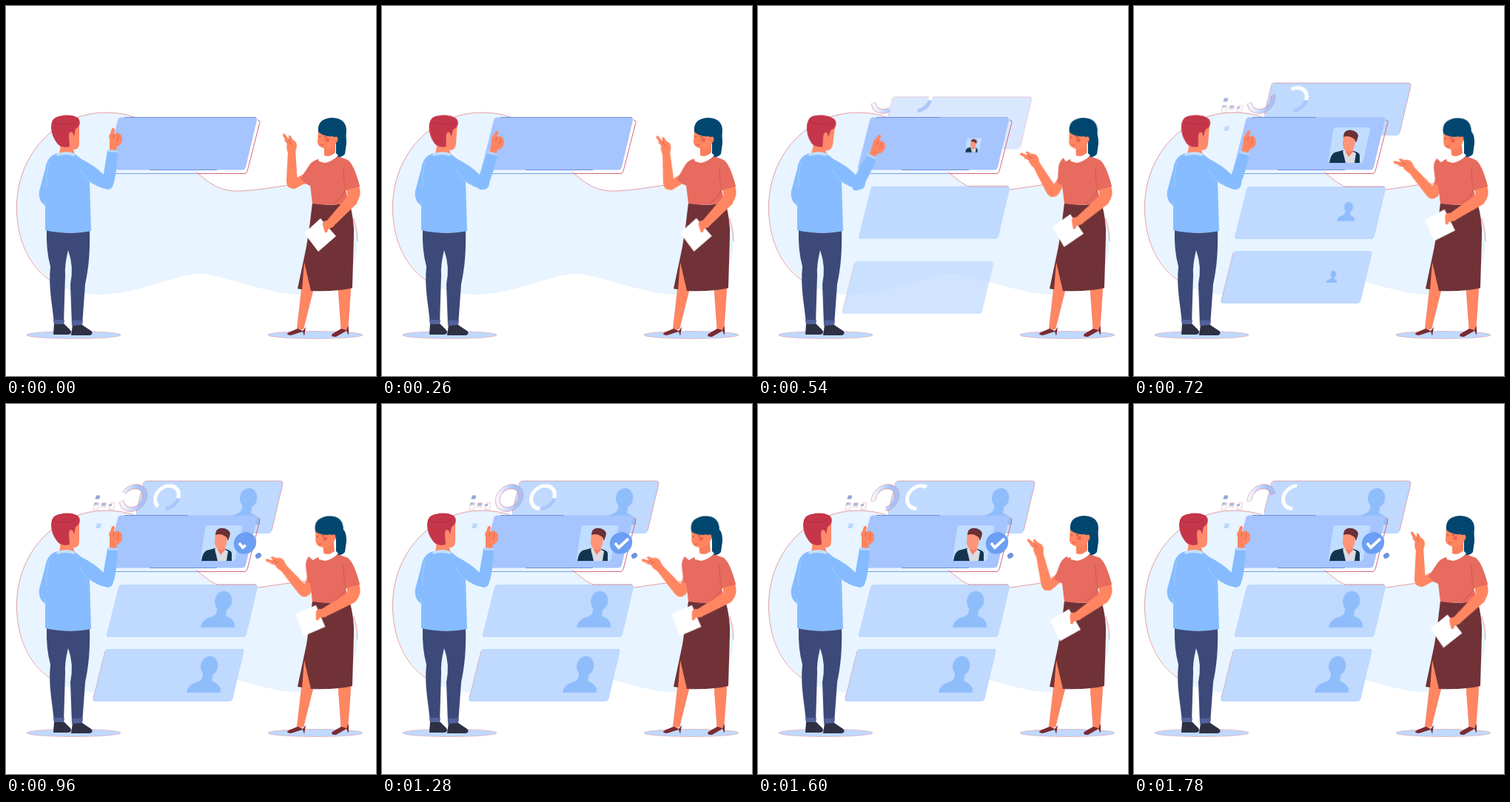
Write an HTML page without scripts that moves like this. It is 500x500 px and loops after 1800 ms.

```html
<!DOCTYPE html>
<html lang="en">
<head>
<meta charset="utf-8">
<title>Choosing a candidate</title>
<style>
html, body { margin: 0; width: 100%; height: 100%; overflow: hidden; background: #fff; }
svg { display: block; width: 100%; height: 100%; }

svg * { animation: 1800ms linear infinite; }

/* people */
.reach { transform-origin: 138px 238px; animation-name: reach; animation-timing-function: ease-in-out; }
.nod { transform-origin: 84px 200px; animation-name: nod; animation-timing-function: ease-in-out; }
.wave { transform-origin: 414px 224px; animation-name: wave; }
.note { transform-origin: 470px 260px; animation-name: note; }
.look { transform-origin: 442px 208px; animation-name: look; animation-timing-function: ease-in-out; }
@keyframes reach {
  0%, 6.7% { transform: none; }
  22.2%, 28% { transform: translate(-4px, 3px) rotate(20deg); }
  40% { transform: translate(-2px, 1px) rotate(10deg); }
  51%, 100% { transform: none; }
}
@keyframes nod {
  0%, 6.7% { transform: none; }
  22.2%, 28% { transform: rotate(8deg); }
  40% { transform: rotate(4.5deg); }
  51%, 100% { transform: none; }
}
@keyframes wave {
  0%, 6.7% { transform: none; animation-timing-function: ease-in; }
  22.2% { transform: rotate(-13deg); animation-timing-function: ease-out; }
  40%, 72% { transform: rotate(-40.5deg); animation-timing-function: ease-in; }
  88.9% { transform: rotate(-13deg); animation-timing-function: ease-out; }
  98.9%, 100% { transform: none; }
}
@keyframes note {
  0%, 6.7% { transform: none; animation-timing-function: ease-in; }
  22.2% { transform: rotate(1deg); }
  40% { transform: rotate(14.5deg); animation-timing-function: ease-out; }
  50%, 72% { transform: rotate(18deg); animation-timing-function: ease-in; }
  88.9% { transform: rotate(12deg); }
  98.9%, 100% { transform: rotate(3deg); }
}
@keyframes look {
  0%, 24% { transform: none; }
  40%, 74% { transform: rotate(-6deg); }
  89%, 100% { transform: none; }
}

/* cards slide along their slant */
.top { animation-name: top; }
.mid { animation-name: mid; }
.low { animation-name: low; }
.edge { animation-name: edge; }
@keyframes top {
  0%, 25% { opacity: 0; transform: translate(-11px, 46px); animation-timing-function: ease-out; }
  37%, 100% { opacity: 1; transform: none; }
}
@keyframes mid {
  0%, 15.5% { opacity: 0; transform: translate(11px, -46px); animation-timing-function: linear; }
  22.2% { opacity: .6; transform: translate(6px, -22px); animation-timing-function: ease-out; }
  31%, 100% { opacity: 1; transform: none; }
}
@keyframes low {
  0%, 23.5% { opacity: 0; transform: translate(-13px, 52px); animation-timing-function: ease-out; }
  35.5%, 100% { opacity: 1; transform: none; }
}
@keyframes edge { 0%, 26% { opacity: 1; } 33%, 100% { opacity: 0; } }

/* avatars, portrait, badge */
.a1 { animation-name: a1; }
.a2 { animation-name: a2; }
.a3 { animation-name: a3; }
.chest { animation-name: chest; }
.photo { animation-name: photo; }
.badge { animation-name: badge; }
.tick { stroke-dasharray: 100 200; animation-name: tick; }
@keyframes a1 { 0%, 41% { transform: scale(0); } 50% { transform: scale(1.05); } 53%, 100% { transform: none; } }
@keyframes a2 { 0%, 34% { transform: scale(0); } 40% { transform: scale(.52); } 48% { transform: scale(1.05); } 53%, 100% { transform: none; } }
@keyframes a3 { 0%, 36% { transform: scale(0); } 40% { transform: scale(.32); } 49% { transform: scale(1.05); } 53%, 100% { transform: none; } }
@keyframes chest { 0%, 90% { transform: none; } 99%, 100% { transform: scaleX(1.12); } }
@keyframes photo { 0%, 27% { transform: scale(0); } 35% { transform: scale(1.06); } 38%, 100% { transform: none; } }
@keyframes badge { 0%, 43% { transform: scale(0); } 52%, 100% { transform: none; } }
@keyframes tick { 0%, 48% { stroke-dashoffset: 100; } 53.3% { stroke-dashoffset: 50; } 60%, 100% { stroke-dashoffset: 0; } }

/* rings: the head grows, then the tail is wiped */
.r1 { animation-name: r1; }
.r2 { animation-name: r2; }
.r3 { animation-name: r3; }
@keyframes r1 {
  0%, 19% { stroke-dasharray: 0 720; stroke-dashoffset: 0; opacity: 0; }
  19.1% { opacity: 1; }
  22.2% { stroke-dasharray: 40 720; }
  40% { stroke-dasharray: 190 720; }
  53.3% { stroke-dasharray: 318 720; }
  62%, 74% { stroke-dasharray: 360 720; stroke-dashoffset: 0; }
  88.9% { stroke-dasharray: 270 720; stroke-dashoffset: -90; }
  98.9%, 100% { stroke-dasharray: 175 720; stroke-dashoffset: -185; opacity: 1; }
}
@keyframes r2 {
  0%, 19% { stroke-dasharray: 0 720; opacity: 0; }
  19.1% { opacity: 1; }
  22.2% { stroke-dasharray: 62 720; }
  26%, 72% { stroke-dasharray: 80 720; stroke-dashoffset: 0; opacity: 1; }
  80%, 100% { stroke-dasharray: 0 720; stroke-dashoffset: -80; opacity: 0; }
}
@keyframes r3 {
  0%, 25% { stroke-dasharray: 0 720; stroke-dashoffset: -80; opacity: 0; }
  25.1% { opacity: 1; }
  40% { stroke-dasharray: 125 720; }
  53.3% { stroke-dasharray: 238 720; }
  62%, 74% { stroke-dasharray: 270 720; stroke-dashoffset: -80; }
  88.9% { stroke-dasharray: 208 720; stroke-dashoffset: -147; }
  98.9%, 100% { stroke-dasharray: 178 720; stroke-dashoffset: -177; opacity: 1; }
}

.bits { animation-name: bits; }
@keyframes bits {
  0%, 30% { opacity: 0; transform: translateY(5px); }
  42%, 100% { opacity: 1; transform: none; }
}
</style>
</head>
<body>
<svg viewBox="0 0 500 500">
  <defs>
    <linearGradient id="sheen">
      <stop offset=".25" stop-color="#a5c2fb"/>
      <stop offset=".95" stop-color="#f3f7ff"/>
    </linearGradient>
    <path id="card" d="M21 0H201q4 0 3 4L189 67q-1 4-5 4H3q-4 0-3-4L16 4q1-4 5-4z"/>
    <g id="avatar" fill="#8fbdfb">
      <ellipse cx="7.500" cy="-12" rx="11.500" ry="13.500" transform="rotate(10 7 -11)"/>
      <path d="M0-4H13L11 8H-3z"/>
      <path class="chest" d="M-23 24Q-22 13-7 9L-1 5H9L12 9Q24 13 23 24z"/>
    </g>
  </defs>

  <path fill="#e8f4ff" d="M14.500 272C14.500 200 68 144 135 144C200 144 215 185 257 224C275 240 290 251 315 250C350 249 380 240 410 240C450 241 475 280 475 318C475 365 440 390 395 389C360 391 305 367 265 362C225 362 180 390 125 390C60 390 14.500 340 14.500 272z"/>
  <g fill="none" stroke="#df8492" stroke-width=".8">
    <path d="M60 371C30 350 14.500 315 14.500 272C14.500 200 68 144 135 144C152 144 166 147 178 152"/>
    <path d="M257 224C275 240 290 251 315 250C350 249 380 240 410 240"/>
    <path d="M470 287Q475 302 475 318"/>
  </g>
  <g fill="#bfd9ff" stroke="#dd9aa8" stroke-width=".6">
    <ellipse cx="91.500" cy="444.500" rx="63.500" ry="5"/>
    <ellipse cx="418" cy="444.500" rx="64" ry="5"/>
  </g>

  <!-- cards -->
  <g fill="#bfd9ff">
    <g class="top">
      <use href="#card" x="170" y="104"/>
      <path d="M176 146L186 106q1-2 4-2H371q3 0 3 4L359 171" fill="none" stroke="#d795a6" stroke-width=".8"/>
    </g>
    <g transform="translate(320 139)"><g class="a1"><use href="#avatar"/></g></g>
    <g class="mid">
      <use href="#card" x="136" y="244"/>
      <path d="M284 244H338" stroke="#d9808f" stroke-width=".9"/>
    </g>
    <g class="low">
      <use href="#card" x="117.500" y="331"/>
      <path d="M134 334L118 398" stroke="#d9a3b2" stroke-width=".7"/>
    </g>
  </g>
  <g transform="translate(286 278)"><g class="a2"><use href="#avatar"/></g></g>
  <g transform="translate(267 366)"><g class="a3"><use href="#avatar"/></g></g>
  <use href="#card" x="135" y="150.500" fill="#a6c4fd"/>
  <g fill="none" stroke-width="1">
    <path d="M160 150.500H246M194 221.500H285" stroke="#6c8fda"/>
    <path class="edge" d="M246 150.500H338" stroke="#6c8fda"/>
    <path d="M146 226.500H258" stroke="#7c9fe8"/>
    <path d="M258 226.500H322q3 0 4-3L343 157q0-3-3-3" stroke="#d9667c"/>
  </g>

  <!-- rings -->
  <g fill="none" stroke-width="5">
    <g transform="translate(172 127) skewX(-12) rotate(-15) scale(-1 1)">
      <circle class="r1" r="15.500" pathLength="360" stroke="#d98c9f" stroke-width="6.200"/>
      <circle class="r1" r="15.500" pathLength="360" stroke="url(#sheen)"/>
    </g>
    <g transform="translate(217.500 126) skewX(-12) rotate(-95) scale(-1 1)">
      <circle class="r2" r="15.500" pathLength="360" stroke="#a9c6fb"/>
      <circle class="r3" r="15.500" pathLength="360" stroke="#fff"/>
    </g>
  </g>

  <g class="bits">
    <path d="M122 123.500h5.500l-1.500 5h-5.500z" fill="#93a6d2"/>
    <g fill="#fff" stroke="#d9a9b6" stroke-width=".6">
      <path d="M120 133.500h6l-2 9.500h-6z"/>
      <path d="M130 133.500h6l-1.500 5.500h-6z"/>
      <path d="M141 133.500h6l-2 9h-6z"/>
    </g>
    <path d="M119.500 133.500h5l-1 3h-5zM130 134h5l-1 3.500h-5zM139.500 135h4l-1 3h-4z" fill="#a9b4d8"/>
    <path d="M123 161.500h6l-1.500 6.500h-6.500z" fill="#b9d7fd"/>
  </g>

  <!-- portrait -->
  <g transform="translate(291 188)"><g class="photo">
    <path d="M-18-24H25q4 0 3 4L19 20q-1 4-4 4H-25q-4 0-3-4L-22-20q1-4 4-4z" fill="#c0ddff"/>
    <path d="M-27 24Q-25 12-20 10L-9 7 6 8Q14 10 14 14V24z" fill="#14344f"/>
    <path d="M-9 8L-5 6 4 8 9 11 7 24H-5z" fill="#d9dce3"/>
    <path d="M-5 4H5V9L-1 16-5 9z" fill="#f58268"/>
    <path d="M-8-13Q-2-17 8-12L7 1Q5 9-1 9-8 8-9-1z" fill="#ff9478"/>
    <path d="M-8-12Q-8-20 1-20.500 12-19 12-12L9-3 7-8Q-1-14-8-11z" fill="#6a3137"/>
  </g></g>

  <!-- badge -->
  <g transform="translate(323 188)"><g class="badge">
    <ellipse rx="15.500" ry="14.500" transform="rotate(-35)" fill="#6c9ef3"/>
    <ellipse cx="18" cy="17" rx="4.200" ry="3.500" transform="rotate(-35 18 17)" fill="#6f94dc"/>
    <path class="tick" pathLength="100" d="M-8 0L-3 6 10-6" fill="none" stroke="#fff" stroke-width="3.800"/>
  </g></g>

  <!-- man -->
  <g>
    <path d="M65 429H78L87 438Q90 443 84 444H64z" fill="#2e3044"/>
    <path d="M90 431H103L115 439Q119 443 113 445H88z" fill="#2e3044"/>
    <path d="M55 302Q85 310 113 304C114 340 110 362 107 376L103 431 89 432 87 376Q92 352 84 330Q79 350 80 364L78 430 65 430C63 404 57 382 60 352Q54 330 55 302z" fill="#3d4978"/>
    <path d="M64 424H79L78 430H65zM89 425H104L103 431 89 432z" fill="#53629b"/>
    <g class="nod">
      <path d="M84 166L99 162V186Q98 195 91 194L93 201H72L74 184z" fill="#ff8a6b"/>
      <path d="M65 152C72 147 88 146 95 150C101 152 101 161 97 164L94 166 92 176 90 171Q85 168 85 176L86 190Q73 193 68 184C61 175 58 159 65 152z" fill="#c5364a"/>
      <path d="M63 157Q76 163 94 158" fill="none" stroke="#a92c42" stroke-width=".8"/>
    </g>
    <path d="M70 199C60 201 55 208 53 220L45 250Q43 263 53 270L53 303Q84 310 115 304L113 236 102 207 92 199z" fill="#86bcff"/>
    <path d="M100 206Q118 214 132 228L144 230Q148 246 138 248Q124 246 110 235L98 220z" fill="#86bcff"/>
    <path d="M68 200Q82 194 94 200L92 203Q81 199 69 203z" fill="#c3def9"/>
    <path d="M58 212Q54 226 55 246M53 262V271M113 238Q105 230 99 220" fill="none" stroke="#a9d0ff" stroke-width=".8"/>
    <g class="reach">
      <path d="M137 196H151Q150 222 146 238Q143 248 135 247Q130 240 132 226z" fill="#86bcff"/>
      <path d="M137 194L151 195 150.500 198 136.500 197z" fill="#b5d7fc"/>
      <path d="M140 194L140 180Q138 175 141 172L143 166Q146 163 147 167L146 173 151 171Q157 174 157 180Q157 187 150 190L149 195z" fill="#ff8561"/>
      <path d="M146 173L145 179M151 174Q153 178 150 183" fill="none" stroke="#e0594a" stroke-width=".9"/>
    </g>
  </g>

  <!-- woman -->
  <g>
    <path d="M400 378L415 384 402 436 393 439zM449 383L466 381 462 437 453 438z" fill="#ff8660" stroke="#e0685a" stroke-width=".5"/>
    <path d="M405 434L403 446 401 440 385 445Q377 444 382 441L394 436 401 439zM463 432V445L460 439 446 447Q438 447 441 443L453 436 460 438z" fill="#7a2b31"/>
    <g class="wave">
      <path d="M413 228L389 241" stroke="#ff8660" stroke-width="12" stroke-linecap="round"/>
      <path d="M381 196L391 193 394 240Q390 248 384 246Q379 244 379 236z" fill="#ff8660"/>
      <path d="M381 199Q378 190 380 186L374 175Q374 171 377 173L382 180 382 175Q385 174 387 180L391 183Q395 187 391 197z" fill="#ff8660"/>
      <path d="M382 180L385 187M376 181L381 186" stroke="#d9534a" stroke-width=".9"/>
      <path d="M422 207Q413 209 408 218L398 233Q403 240 411 243L426 238z" fill="#e76b5e"/>
    </g>
    <path d="M414 266Q440 272 464 265Q471 290 470 312L468 381Q450 386 412 385L394 382 406 325Q411 295 414 266z" fill="#703237"/>
    <path d="M403 346L400 384 412 385z" fill="#ff8660"/>
    <path d="M426 206Q416 207 411 218L411 242 414 267Q440 271 464 266L459 249 478 244Q471 215 462 208L446 202z" fill="#e76b5e"/>
    <path d="M456 218Q456 235 459 249M459 249Q452 262 443 266" fill="none" stroke="#c9524d" stroke-width=".8"/>
    <path d="M446 166Q461 166 460 186L458 200Q453 206 446 203z" fill="#00466e"/>
    <g class="look">
      <path d="M430 186H445V203L435 210 430 204z" fill="#f97f5c"/>
      <path d="M422 168H447V184Q443 193 433 193Q420 191 421 182z" fill="#ff8660"/>
      <circle cx="434" cy="181" r="2.800" fill="#f0604f"/>
      <path d="M423 177h2M430 177h3" stroke="#7a3a3c" stroke-width=".9"/>
      <path d="M424 187Q427 189 430 187" fill="none" stroke="#d9574b" stroke-width=".9"/>
      <path d="M422 170Q420 153 439 151Q459 151 460 167L459 187Q449 190 447 178L441 176Q430 177 422 170z" fill="#00466e"/>
      <ellipse cx="446" cy="180" rx="2.500" ry="3.500" fill="#ff8660"/>
    </g>
    <path d="M426 200Q421 206 423 210L431 212Q441 210 449 202L445 198Q435 207 426 200z" fill="#fff"/>
    <path d="M460 246L477 243Q482 256 473 266L463 264z" fill="#ff8660"/>
    <g class="note">
      <path d="M425 287L446 311 422 332 403 307z" fill="#fff"/>
      <path d="M464 254L432 292 441 299 474 267Q478 258 471 252z" fill="#ff8660"/>
      <path d="M444 290L433 290Q427 291 428 296L431 306Q435 307 435 302L443 298z" fill="#ff8660"/>
    </g>
    <path d="M458 240L476 236 478 244 459 249z" fill="#e76b5e"/>
  </g>
</svg>
</body>
</html>
```
